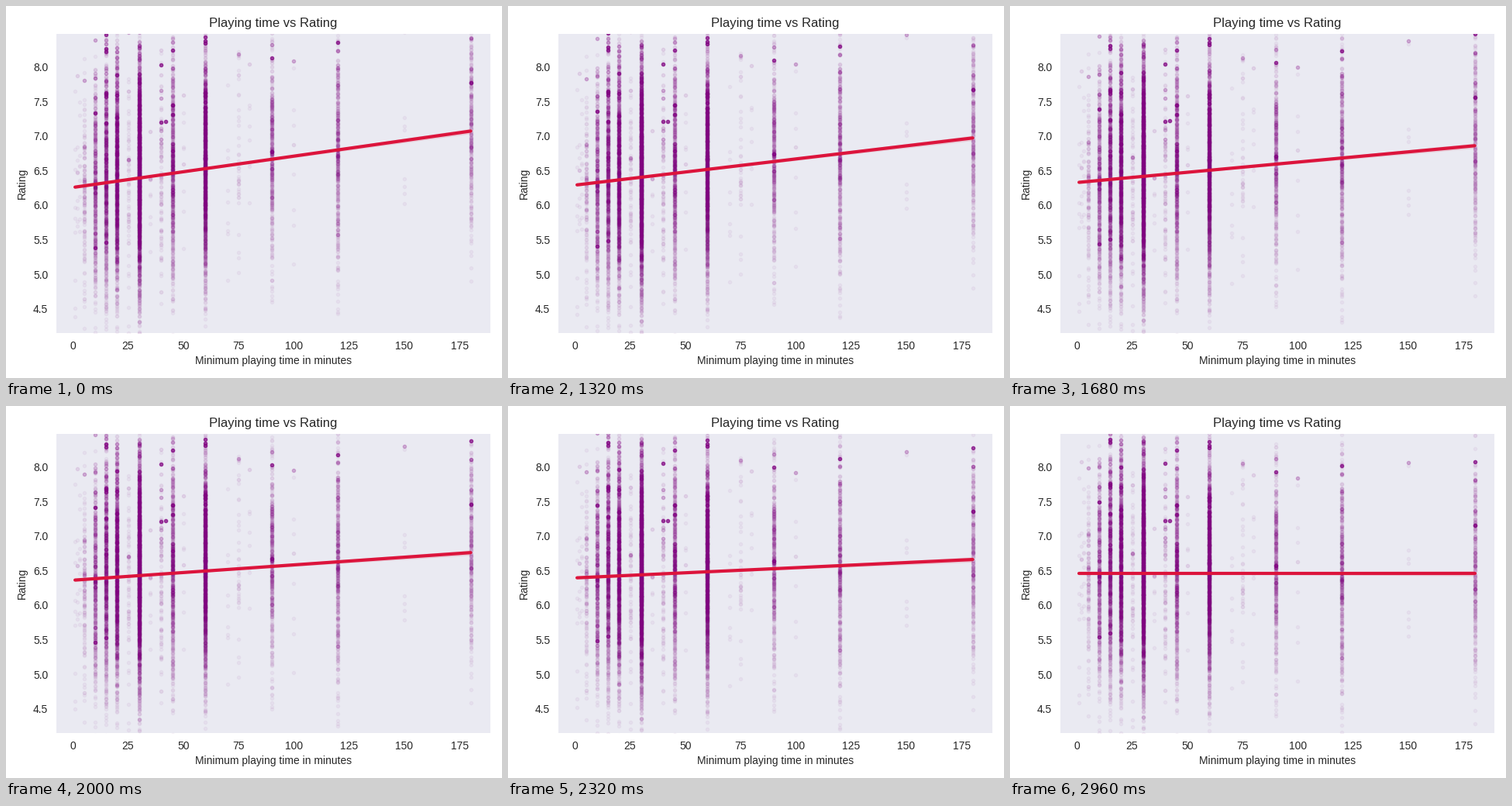
Animation of 640x480 px, one loop 5000 ms. Source, as a matplotlib script:

```python
import numpy as np
import matplotlib.pyplot as plt
from matplotlib.animation import FuncAnimation

plt.rcParams.update({
    "font.family": "Liberation Sans",
    "text.color": ".15",
    "axes.labelcolor": ".15",
    "xtick.color": ".15",
    "ytick.color": ".15",
    "axes.facecolor": "#EAEAF2",
    "lines.solid_capstyle": "round",
})

FRAMES, STEP = 125, 40
START, MOVES = 25, 49
MEAN, SPREAD = 6.46, 0.82
ALPHAS = (0.04, 0.09, 0.25, 0.7)

# games per playing time; the odd times hold only a handful
COMMON = {5: 130, 10: 520, 15: 900, 20: 1300, 25: 70, 30: 2600, 40: 100,
          45: 700, 60: 1700, 75: 40, 90: 430, 120: 480, 180: 330}
ODD = (1, 2, 3, 35, 50, 70, 80, 100, 150)

# well-known games that stand out from their column
KNOWN = [(5, 7.8), (75, 8.18), (90, 8.32), (100, 8.08), (120, 8.23),
         (150, 8.54), (180, 8.42)]
FAMOUS = [(15, 7.6), (40, 8.03), (40, 7.2), (42, 7.21), (60, 8.43),
          (90, 8.13), (120, 8.35)]


def trend(x):
    return 6.26 + (7.07 - 6.26) * (x - 1) / 179


def make_games():
    rng = np.random.default_rng(7)
    counts = COMMON | {m: 9 for m in ODD}
    x = np.repeat(list(counts), list(counts.values()))
    size = np.repeat(list(counts.values()), list(counts.values()))
    z = rng.normal(size=x.size)
    # better rated games and crowded columns get more attention
    fame = rng.normal(size=x.size) + .4 * z + .25 * np.log10(size / 700)
    level = np.digitize(fame, (1.0, 2.1, 2.9))
    extra = np.array(KNOWN + FAMOUS)
    extra_level = [2] * len(KNOWN) + [3] * len(FAMOUS)
    return (np.append(x, extra[:, 0]),
            np.append(trend(x) + SPREAD * z, extra[:, 1]),
            np.append(level, extra_level))


fig, ax = plt.subplots(figsize=(6.4, 4.8), dpi=100)
fig.subplots_adjust(left=65 / 640, right=625 / 640,
                    bottom=58 / 480, top=444 / 480)
ax.set_xlim(-7.45, 188.9)
ax.set_ylim(4.15, 8.475)
ax.spines[:].set_visible(False)
ax.set_xticks(range(0, 176, 25))
ax.set_yticks(np.arange(4.5, 8.1, .5))
ax.tick_params(axis="x", length=0, pad=7)
ax.tick_params(axis="y", length=0, pad=7.7)
ax.set_title("Playing time vs Rating", pad=6.5)
ax.set_xlabel("Minimum playing time in minutes")
ax.set_ylabel("Rating", labelpad=5.5)

games_x, games_y, games_level = make_games()
layers = []
for level, alpha in enumerate(ALPHAS):
    pick = games_level == level
    x, y = games_x[pick], games_y[pick]
    dots = ax.scatter(x, y, s=9, color="purple", alpha=alpha, linewidths=1)
    layers.append((dots, x, y))

line_x = np.linspace(1, 180, 60)
half = .012 + .025 * np.abs(line_x - 45) / 135
band = ax.fill_between(line_x, MEAN - half, MEAN + half,
                       color="crimson", alpha=.15, linewidth=0)
line, = ax.plot(line_x, trend(line_x), color="crimson", lw=3)


def draw(i):
    p = min(max((i - START) / MOVES, 0), 1)
    for dots, x, y in layers:
        dots.set_offsets(np.column_stack([x, y - p * (trend(x) - MEAN)]))
    fit = trend(line_x) * (1 - p) + MEAN * p
    line.set_ydata(fit)
    edge_x = np.append(line_x, line_x[::-1])
    edge_y = np.append(fit - half, (fit + half)[::-1])
    band.set_verts([np.column_stack([edge_x, edge_y])])
    return [dots for dots, _, _ in layers] + [band, line]


anim = FuncAnimation(fig, draw, frames=FRAMES, interval=STEP,
                     repeat=True, repeat_delay=0, blit=False)
plt.show()
```
